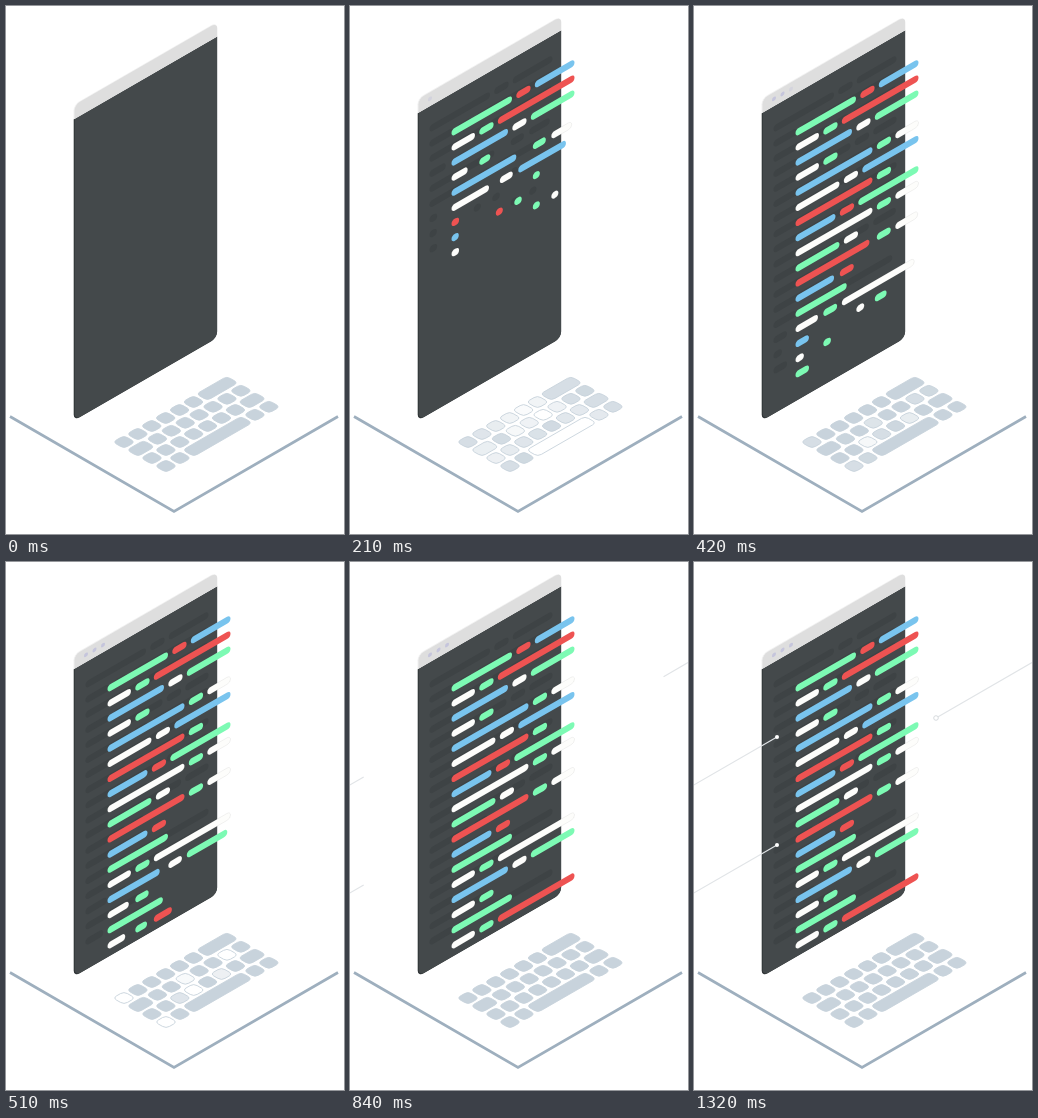
Animation, 338 px wide and 528 px high, one loop 1350 ms. Source, as an HTML page with a canvas:

```html
<!DOCTYPE html>
<html lang="en">
<head>
<meta charset="utf-8">
<title>Isometric code screen</title>
<style>
  html, body { margin: 0; height: 100%; overflow: hidden; background: #fff; }
  canvas { display: block; }
</style>
</head>
<body>
<canvas id="stage" width="338" height="528"></canvas>
<script>
const ctx = document.getElementById('stage').getContext('2d');
const LOOP = 1350, STEP = 30, SLOPE = Math.tan(Math.PI / 6);
const COLORS = { g: '#7dfab4', r: '#ee5352', b: '#79c4ee', w: '#fdfdfb' };

// Each code line: end of its first bar, bar colours, start time
const LINES = [
  [162, 'grb', 30], [125, 'wgr', 30], [158, 'bwg', 30],
  [125, 'wg', 146], [178.5, 'bgw', 115], [145.5, 'wwb', 115],
  [178.5, 'rg', 209], [141.5, 'brg', 209], [178.5, 'wgw', 209],
  [145.5, 'gw', 305], [178.5, 'rgw', 310], [141.5, 'br', 310],
  [162, 'g', 325], [125, 'wgw', 312], [158, 'bwg', 405],
  [125, 'wg', 410], [162, 'g', 406], [125, 'wgr', 435]
];

// Keyboard rows: [from, to, ...times at which the key lights up], in key units
const key = (center, ...peaks) => [center - .4, center + .4, ...peaks];
const KEYS = [
  [key(0, 120, 510), key(1, 140), key(2, 160), key(3, 180), key(4, 220), key(5, 240), [5.6, 7.8, 300]],
  [[-.4, .8, 165], key(1.4, 305), key(2.4, 190), key(3.4, 175, 495), key(4.4, 210), key(5.4, 245),
   key(6.4, 120, 510), key(7.4, 315)],
  [key(0, 170), key(1, 155), key(2, 140, 440), key(3, 130, 510), key(4, 310), key(5, 145, 470),
   key(6, 270), [6.6, 7.8, 300]],
  [key(0, 120, 510), key(1, 315), [1.6, 5.8, 210], key(6.4, 270), key(7.4, 300)]
];

const clamp = v => Math.max(0, Math.min(1, v));
const progress = (t, start, duration) => clamp((t - start) / duration);

function box(x, y, w, h, radius, fill) {
  ctx.beginPath();
  ctx.roundRect(x, y, w, h, radius);
  ctx.fillStyle = fill;
  ctx.fill();
}

function polyline(points, color, width) {
  ctx.beginPath();
  points.forEach(p => ctx.lineTo(...p));
  ctx.strokeStyle = color;
  ctx.lineWidth = width;
  ctx.stroke();
}

// Plane of the screen: vertical positions are measured at x = 68
const screenPlane = (dx = 0, dy = 0) =>
  ctx.setTransform(1, -SLOPE, 0, 1, dx, 68 * SLOPE + dy);
const flat = () => ctx.setTransform(1, 0, 0, 1, 0, 0);

function drawKeyboard(t) {
  ctx.setTransform(13.9, -8, 14, 8, 118, 436);
  KEYS.forEach((row, b) => row.forEach(([from, to, ...peaks]) => {
    const light = Math.max(...peaks.map(p => clamp(1 - Math.abs(t - p) / 120)));
    const mix = c => Math.round(c + (255 - c) * light);
    box(from, b - .4, to - from, .8, .25, `rgb(${mix(200)},${mix(211)},${mix(220)})`);
    ctx.strokeStyle = '#c8d3dc';
    ctx.lineWidth = .05;
    ctx.stroke();
  }));
  flat();
}

function drawScreen(t) {
  const top = 92.3 + 6.2 * (1 - progress(t, 0, 120));
  const body = top + 14.7;
  screenPlane();
  box(67.7, body, 143.3, 414.5 - body, [0, 0, 6, 6], '#303537');
  box(68.7, body, 142.5, 414.3 - body, [0, 0, 6, 6], '#44494b');
  box(67.5, top, 143.7, 14.7, [6, 6, 0, 0], '#f1f1f1');
  box(68.5, top + .8, 142.7, 13.9, [5.5, 5.5, 0, 0], '#dedede');
  [80, 88.5, 97].forEach((x, i) => {
    ctx.globalAlpha = progress(t, 170 + i * 110, 80);
    box(x - 2, 97.8, 4, 4, 2, '#c5c5dc');
  });
  ctx.globalAlpha = 1;
}

function drawCode(t, shadow) {
  screenPlane(shadow ? -22 : 0, shadow ? -4 : 0);
  LINES.forEach(([end, colors, start], row) => {
    const spans = [[101.5, end], [end + 4.3, end + 18.6], [end + 22.8, 224.5]];
    [...colors].forEach((c, i) => {
      const slow = row === LINES.length - 1 && i === 2;
      const p = slow ? progress(t, 457, 333) : progress(t, start, 115);
      if (!p) return;
      const [x, right] = spans[i];
      box(x, 143.2 + row * 15.12, 7 + (right - x - 7) * p, 7, 3.5, shadow ? '#3e4345' : COLORS[c]);
      if (c === 'w' && !shadow) {
        ctx.strokeStyle = 'rgba(0,0,0,.12)';
        ctx.lineWidth = .4;
        ctx.stroke();
      }
    });
  });
  flat();
}

function drawCallouts(t) {
  const p = progress(t, 700, 550), dot = progress(t, 1230, 60);
  if (!p) return;
  const ray = (x0, x1, x2, y2) => {
    const x = x0 + (x1 - x0) * p;
    const at = v => [v, y2 - (v - x2) * SLOPE];
    polyline([at(x0), at(x)], '#e1e4e7', 1.2);
  };
  const circle = (x, y, r, outlined) => {
    ctx.beginPath();
    ctx.arc(x, y, r * dot, 0, 7);
    ctx.fillStyle = '#fff';
    ctx.fill();
    if (outlined && dot) {
      ctx.strokeStyle = '#cdd2d6';
      ctx.lineWidth = .8;
      ctx.stroke();
    }
  };
  [175, 283].forEach(y => {
    ray(-10, 83, 83, y);
    circle(83, y, 2);
  });
  ray(338, 242, 242, 156);
  circle(242, 156, 2.3, true);
}

function draw(now) {
  const t = Math.floor(now % LOOP / STEP) * STEP;
  flat();
  ctx.fillStyle = '#fff';
  ctx.fillRect(0, 0, 338, 528);
  polyline([[4, 410.5], [168, 505.5], [332, 410.5]], '#9eafbe', 2.7);
  drawKeyboard(t);
  drawScreen(t);
  drawCode(t, true);
  drawCode(t, false);
  drawCallouts(t);
}

const begin = performance.now();
function tick() {
  draw(performance.now() - begin);
  requestAnimationFrame(tick);
}
tick();
</script>
</body>
</html>
```
